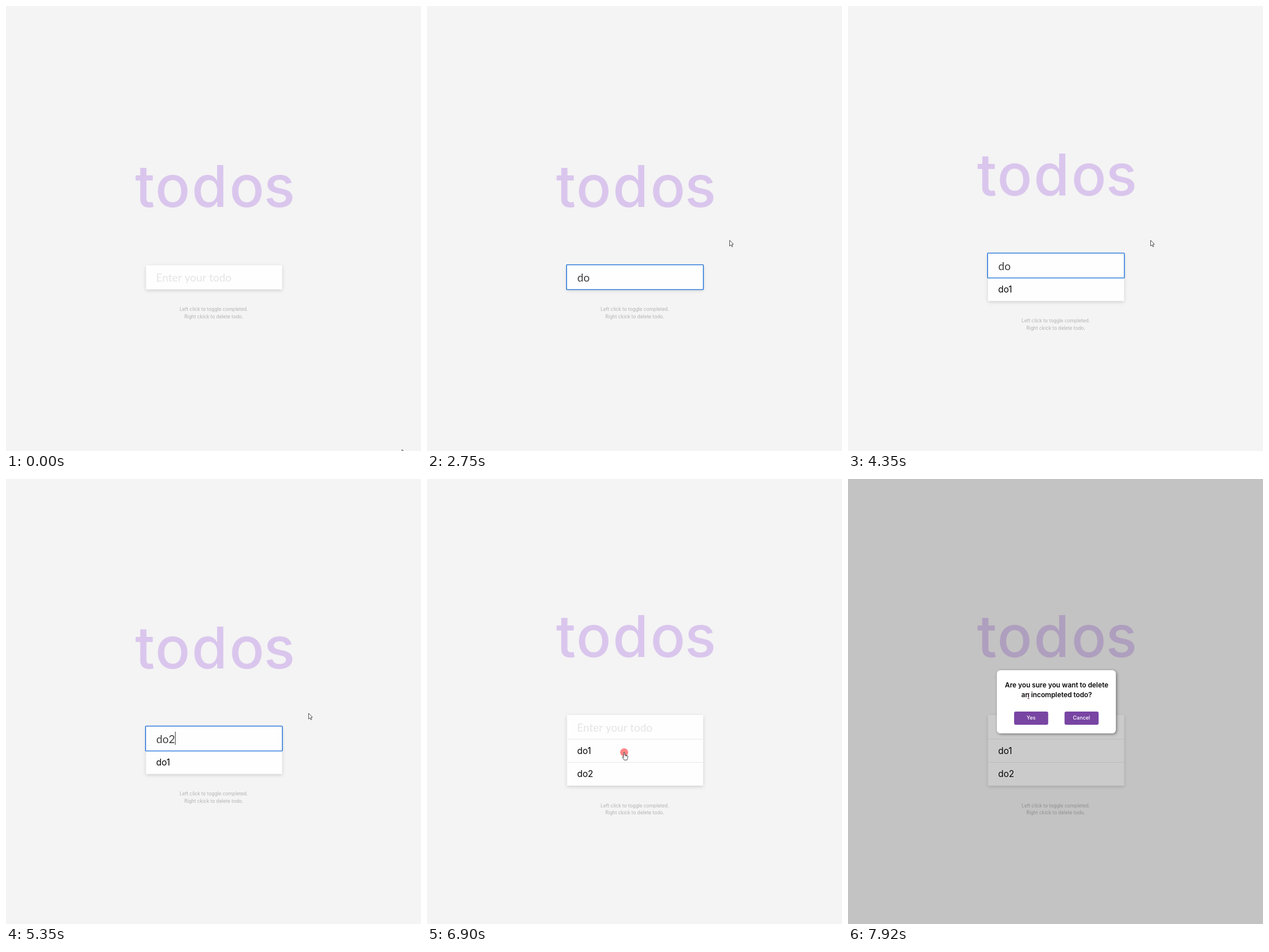
An HTML page with a canvas for the animation above (7990 ms loop, 722 px wide and 775 px high).

```html
<!DOCTYPE html>
<html lang="en">
<head>
<meta charset="utf-8">
<title>Todo list</title>
<style>
  html, body { margin: 0; width: 722px; height: 775px; overflow: hidden; background: #f4f4f4; }
  canvas { display: block; }
</style>
</head>
<body>
<canvas id="stage" width="722" height="775"></canvas>
<script>
const ctx = document.getElementById('stage').getContext('2d');
const LOOP = 7990;
const FOCUS = 601, BLUR = 6830, MODAL = 6970;
const BOX = { x: 243.5, w: 237, input: 42, row: 40.5 };
const SANS = 'Inter, sans-serif';
const INPUT_FONT = '19px Lato, sans-serif';

const todos = [{ at: 3280, text: 'do1' }, { at: 5880, text: 'do2' }];
const typing = [[0, ''], [2550, 'd'], [2750, 'do'], [3080, 'do1'], [3280, ''],
  [4150, 'd'], [4350, 'do'], [4950, 'do2'], [5880, '']];
const caretOn = [[FOCUS, 1140], [1670, 2200], [3280, 3820], [4880, 4950], [5350, 6410]];

// Pointer moves: each point is [time, x, y]; positions advance in discrete steps.
const moves = [
  { start: 70, step: 730 / 11, points: [[0, 689, 772.5], [601, 458, 470], [800, 526, 408]] },
  { start: 870, step: 70, points: [[870, 526.5, 408]] },
  { start: 6360, step: 67.5, points: [[6290, 526.5, 408], [6900, 343, 476]] },
  { start: 7430, step: 70, points: [[7360, 343, 476], [7920, 314, 378]] }
];

const between = (v, a, b) => v >= a && v < b;
const ease = p => p * p * (3 - 2 * p);

function pointerAt(time) {
  const move = moves.filter(m => time >= m.start).pop();
  if (!move) return moves[0].points[0].slice(1);
  const { start, step, points } = move;
  const t = start + Math.floor((time - start) / step + 1e-6) * step;
  for (let i = 1; i < points.length; i++) {
    const [t0, x0, y0] = points[i - 1], [t1, x1, y1] = points[i];
    if (t < t1) {
      const p = ease((t - t0) / (t1 - t0));
      return [x0 + (x1 - x0) * p, y0 + (y1 - y0) * p];
    }
  }
  return points[points.length - 1].slice(1);
}

function text(str, x, y, font, color, align = 'left') {
  ctx.font = font;
  ctx.fillStyle = color;
  ctx.textAlign = align;
  ctx.fillText(str, x, y);
}

function panel(x, y, w, h, radius, color, shadow) {
  ctx.save();
  if (shadow) {
    ctx.shadowColor = `rgba(0,0,0,${shadow.alpha})`;
    ctx.shadowBlur = shadow.blur;
    ctx.shadowOffsetX = shadow.x;
    ctx.shadowOffsetY = shadow.y;
  }
  ctx.fillStyle = color;
  ctx.beginPath();
  ctx.roundRect(x, y, w, h, radius);
  ctx.fill();
  ctx.restore();
}

function drawTitle(baseline) {
  const centres = [241, 290, 353, 419, 475.5];
  ctx.font = `500 101px ${SANS}`;
  ctx.fillStyle = '#dac6ed';
  ctx.textAlign = 'left';
  [...'todos'].forEach((letter, i) => {
    const m = ctx.measureText(letter);
    const inkCentre = (m.actualBoundingBoxRight - m.actualBoundingBoxLeft) / 2;
    ctx.fillText(letter, centres[i] - inkCentre, baseline);
  });
}

function drawInput(time, top, focused) {
  const typed = typing.filter(([at]) => time >= at).pop()[1];
  text(typed || 'Enter your todo', typed ? 261.5 : 261, top + 28.5, INPUT_FONT, typed ? '#404040' : '#e5e5e5');
  if (!focused) return;
  ctx.strokeStyle = '#1a70dc';
  ctx.lineWidth = 1.4;
  ctx.beginPath();
  ctx.roundRect(BOX.x - 0.8, top - 0.9, BOX.w + 1.1, BOX.input + 1.3, 1);
  ctx.stroke();
  if (caretOn.some(([a, b]) => between(time, a, b))) {
    ctx.fillStyle = '#404040';
    ctx.fillRect(Math.round(262 + ctx.measureText(typed).width), Math.round(top + 9), 1, 23);
  }
}

function drawList(time, items, top, focused) {
  const height = BOX.input + BOX.row * items.length;
  panel(BOX.x, top, BOX.w, height, 0.5, '#fefefe', { alpha: 0.15, blur: 6, x: 0, y: 2 });
  items.forEach((item, i) => {
    const y = top + BOX.input + BOX.row * i;
    ctx.fillStyle = '#e9e9e9';
    ctx.fillRect(BOX.x, y - 0.5, BOX.w, 1);
    text(item.text, 261.3, y + 25.5, `15.3px ${SANS}`, '#050505');
  });
  drawInput(time, top, focused);
}

function drawModal() {
  ctx.fillStyle = 'rgba(0,0,0,.2)';
  ctx.fillRect(0, 0, 722, 775);
  panel(259, 333, 207, 110, 6, '#fff', { alpha: 0.42, blur: 5, x: 1.5, y: 1.5 });
  const heading = `600 11.8px ${SANS}`;
  text('Are you sure you want to delete', 363, 363, heading, '#080808', 'center');
  text('an incompleted todo?', 363, 380, heading, '#080808', 'center');
  [['Yes', 289], ['Cancel', 376.7]].forEach(([label, x]) => {
    panel(x, 405, 59.3, 23, 3, '#7845a3');
    text(label, x + 29.5, 419.2, `500 9px ${SANS}`, '#fff', 'center');
  });
}

function polygon(points) {
  ctx.beginPath();
  points.forEach(([x, y]) => ctx.lineTo(x, y));
  ctx.closePath();
  ctx.fill();
  ctx.stroke();
}

const pointers = {
  arrow() {
    polygon([[0, 0], [0, 10], [2.2, 8], [3.9, 11.3], [5.4, 10.6], [3.8, 7.3], [6.7, 7]]);
  },
  hand() {
    polygon([[-0.9, 0.8], [0, 0], [1, 0.8], [1.1, 4.6], [5.2, 5.4], [6.4, 6.6], [6, 10.2],
      [5, 13.4], [0, 13.4], [-3.2, 8.6], [-2.6, 7.7], [-0.8, 9]]);
    ctx.beginPath();
    ctx.moveTo(2.7, 5); ctx.lineTo(2.7, 7);
    ctx.moveTo(4.4, 5.3); ctx.lineTo(4.4, 7.2);
    ctx.stroke();
  },
  beam() {
    ctx.strokeStyle = '#6b3045';
    ctx.beginPath();
    ctx.moveTo(-1.8, -4.5); ctx.lineTo(1.8, -4.5);
    ctx.moveTo(0, -4.5); ctx.lineTo(0, 4.5);
    ctx.moveTo(-1.8, 4.5); ctx.lineTo(1.8, 4.5);
    ctx.stroke();
  }
};

function pointerKind(x, y, top, count, modal) {
  if (modal) {
    if (between(x, 272, 454) && between(y, 352, 386)) return 'beam';
    return between(x, 289, 348) && between(y, 405, 428) ? 'hand' : 'arrow';
  }
  if (!between(x, BOX.x, BOX.x + BOX.w) || y < top) return 'arrow';
  if (y < top + BOX.input) return 'beam';
  return y < top + BOX.input + BOX.row * count ? 'hand' : 'arrow';
}

function drawPointer(x, y, kind) {
  ctx.save();
  ctx.translate(x, y);
  ctx.fillStyle = '#fff';
  ctx.strokeStyle = '#222';
  ctx.lineWidth = 0.8;
  ctx.lineJoin = 'round';
  pointers[kind]();
  ctx.restore();
}

function draw(time) {
  const items = todos.filter(item => time >= item.at);
  const shift = items.length * BOX.row / 2;
  const top = 451.5 - shift;
  const modal = time >= MODAL;
  const [x, y] = pointerAt(time);

  ctx.fillStyle = '#f4f4f4';
  ctx.fillRect(0, 0, 722, 775);
  drawTitle(350 - shift);
  drawList(time, items, top, between(time, FOCUS, BLUR));
  const hint = `8.35px ${SANS}`;
  text('Left click to toggle completed.', 361.5, 531 + shift, hint, '#b2b2b2', 'center');
  text('Right ckick to delete todo.', 361.5, 543.5 + shift, hint, '#b2b2b2', 'center');
  if (modal) drawModal();

  if (between(time, BLUR, MODAL)) {
    ctx.fillStyle = 'rgba(255,0,0,.47)';
    ctx.beginPath();
    ctx.arc(x, y, 7, 0, Math.PI * 2);
    ctx.fill();
  }
  drawPointer(x, y, pointerKind(x, y, top, items.length, modal));
}

const began = performance.now();
function tick() {
  draw((performance.now() - began) % LOOP);
  requestAnimationFrame(tick);
}
tick();
</script>
</body>
</html>
```
